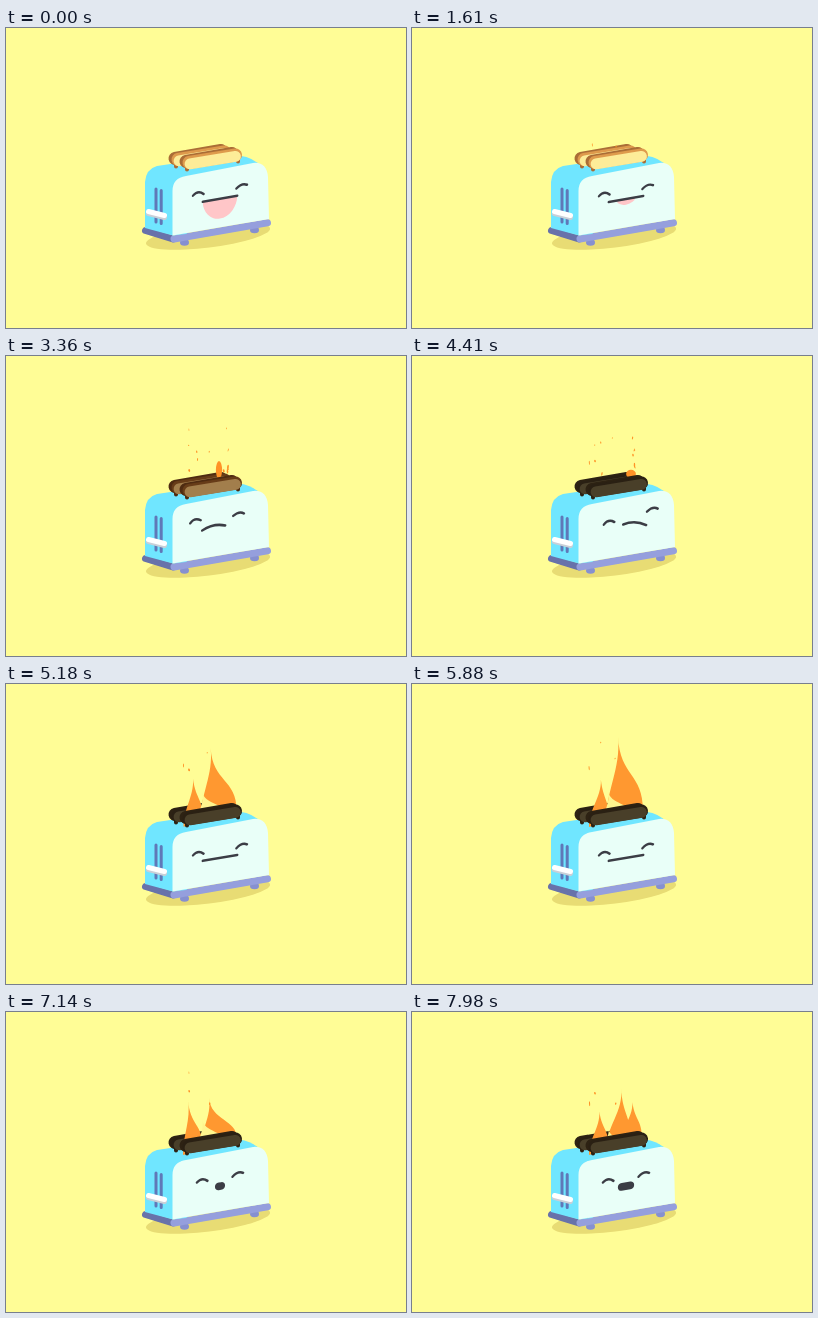
Write an HTML page that moves like this. It is 400 px wide and 300 px high and loops after 8000 ms.

```html
<!DOCTYPE html>
<html lang="en">
<head>
<meta charset="utf-8">
<title>Toaster</title>
<style>
html, body { margin: 0; width: 100%; height: 100%; overflow: hidden; background: #fffd96; }
svg { display: block; width: 100vw; height: 100vh; }
</style>
</head>
<body>
<svg viewBox="0 0 400 300">
  <defs>
    <g id="slice" fill="none" stroke-linecap="round">
      <path d="M181 138V141.5M232 130V133.5" stroke="var(--crust)" stroke-width="4"/>
      <path d="M180 133.5L226 125.5" stroke="var(--crust)" stroke-width="13"/>
      <path d="M183 134.5L229.5 127" stroke="var(--rim)" stroke-width="13"/>
      <path d="M184 135.8L229.5 128.3" stroke="var(--crumb)" stroke-width="10.8"/>
    </g>
  </defs>
  <rect width="400" height="300" fill="#fffd96"/>
  <ellipse cx="202" cy="208" rx="62.5" ry="11.5" transform="rotate(-7 202 208)" fill="#e8dc74"/>

  <g fill="#8690d0">
    <ellipse cx="178.5" cy="214.5" rx="4.5" ry="3.2"/>
    <ellipse cx="248.5" cy="202" rx="4.5" ry="3.2"/>
  </g>
  <g fill="none" stroke-width="7" stroke-linecap="round">
    <path d="M139.5 202.500L167 211" stroke="#6872aa"/>
    <path d="M168 211L261.500 194.800" stroke="#959fdd"/>
  </g>

  <path d="M139 200V154Q140 141 151 138L222 127.500Q240 126 251 134.500L261 150L180 206L167 207.500Z" fill="#70e6ff"/>
  <path d="M166.500 207.500V163Q166.500 150 180 148L247 135Q260.500 133.500 262 149L263 191Z" fill="#e9fff8"/>
  <path d="M150 161V194M155.200 162.500V195.500" stroke="#5f78b8" stroke-width="3" stroke-linecap="round"/>
  <g stroke-width="5" stroke-linecap="round">
    <path d="M142.500 185.500L158.500 189.500" stroke="#c9d0d8"/>
    <path d="M142.500 183.500L158.500 187.500" stroke="#fff"/>
  </g>

  <g id="toast">
    <use href="#slice" x="-11" y="-3"/>
    <g id="fire">
      <path id="flame" fill="#ff9830"/>
      <path id="core" fill="#fff58e"/>
    </g>
    <g fill="#ff9226">
      <ellipse id="ember"/>
      <g id="sparks"></g>
    </g>
    <use href="#slice"/>
  </g>

  <g id="face" fill="none" stroke="#3b3d45" stroke-width="2.4" stroke-linecap="round">
    <path id="tongue" fill="#ffc6c8" stroke="none"/>
    <path id="mouth"/>
    <path id="eyeL" d="M-5.300 1.200Q-0.500 -3.700 5.300 1.400"/>
    <path id="eyeR" d="M-5.300 1.600Q0 -3.500 5.300 -0.400"/>
  </g>
</svg>
<script>
const LOOP = 8000, STEP = 70, TURN = 420;
const IGNITE = 4480;
const $ = id => document.getElementById(id);
const mix = (a, b, k) => a + (b - a) * k;
const clamp = v => Math.max(0, Math.min(1, v));
const ease = k => k * k * (3 - 2 * k);
const ramp = (t, from, length) => clamp((t - from) / length);
const set = (id, attrs) => {
  for (const name in attrs) $(id).setAttribute(name, attrs[name]);
};

// The neutral face; each mood names only what it changes.
const neutral = {
  x: 0, y: 0, spread: 21.7, lean: 0, brow: 0,
  mouthX: 0, mouthY: 6.2, half: 17.2, bend: 0, line: 2.5, tongue: 0
};
const squint = { y: 2.5, spread: 17.8, mouthY: 6.7, line: 7.7 };
const moods = [
  { at: 0, y: -1, mouthY: 6.8, tongue: 17.2 },
  { at: 1410 },
  { at: 2240, x: -3, y: -1.5, lean: .5, brow: 8, mouthX: -3.3, mouthY: 7.9, half: 11.5, bend: -5 },
  { at: 3710, x: 4.7, y: -3, lean: -2.5, brow: 5, mouthX: 4, mouthY: 7.5, half: 11.5, bend: -5 },
  { at: 4620, y: 2.7 },
  { at: 5950, y: 2.7, mouthY: 12, half: 2, line: 13 },
  { at: 6580, ...squint, half: 1.2 },
  { at: 7280, ...squint, half: 4.3 }
].map(mood => ({ ...neutral, ...mood }));

function drawFace(t) {
  const f = { ...moods[0] };
  for (const mood of moods) {
    const k = ease(ramp(t, mood.at, TURN));
    for (const key in f) f[key] = mix(f[key], mood[key], k);
  }
  const { mouthX: mx, mouthY: my, half, tongue } = f;
  const drop = -f.lean * .08 * half;
  set("face", { transform: `translate(${214 + f.x} ${165 + f.y}) skewY(-9.8)` });
  set("eyeL", { transform: `translate(${-f.spread} ${-2.2 - f.lean}) rotate(${-f.brow})` });
  set("eyeR", { transform: `translate(${f.spread} ${-2.2 + f.lean}) rotate(${f.brow})` });
  set("mouth", {
    d: `M${mx - half} ${my - drop}Q${mx} ${my + f.bend} ${mx + half} ${my + drop}`,
    "stroke-width": f.line
  });
  set("tongue", {
    d: tongue > .2 ? `M${mx - tongue} ${my}A${tongue} ${tongue ** 2 / 15} 0 0 0 ${mx + tongue} ${my}Z` : ""
  });
}

// Fresh, brown and charred
const shades = {
  crumb: ["#fdec98", "#a27e4c", "#493f29"],
  rim: ["#de9a4c", "#673c18", "#2a2013"],
  crust: ["#aa6d36", "#4e2b11", "#2d2213"]
};
const channels = hex => [1, 3, 5].map(i => parseInt(hex.slice(i, i + 2), 16));

function drawToast(t) {
  const burn = ramp(t, 1650, 1710) + ramp(t, 3360, 980);
  const i = burn < 1 ? 0 : 1;
  for (const name in shades) {
    const to = channels(shades[name][i + 1]);
    const rgb = channels(shades[name][i]).map((v, n) => Math.round(mix(v, to[n], burn - i)));
    $("toast").style.setProperty("--" + name, `rgb(${rgb})`);
  }
}

// One lick of fire, standing on the slanted slice between x0 and x1.
function lick(x0, x1, tipX, tipY) {
  const floor = x => 143 - (x - 177) * .3;
  const h = floor((x0 + x1) / 2) - tipY;
  return `M${x0} ${floor(x0)}C${x0} ${floor(x0) - h * .4} ${tipX + 3} ${tipY + h * .4} ${tipX} ${tipY}` +
    `C${tipX + 2} ${tipY + h * .5} ${x1} ${tipY + h * .45} ${x1} ${floor(x1)}Z`;
}

function drawFire(t) {
  const grow = ease(ramp(t, IGNITE, 770));
  $("fire").style.display = grow ? "" : "none";
  if (!grow) return;
  const turn = 2 * Math.PI * (t - 5880) / 840;
  const surge = Math.cos(turn), swing = Math.sin(turn / 2), fork = Math.max(0, swing);
  set("flame", {
    d: lick(177, 197, 186.5 + 2 * surge + 2.5 * swing, 92 + 4 * swing) +
      lick(194, 231 - 12 * fork, 206 + 3 * swing, 67 - 14 * surge - 5 * swing) +
      lick(208, 230, 220, mix(122, 87, fork))
  });
  set("core", { d: lick(191, 220 - 12 * fork, 196, 107 + 9 * fork) });
  const wide = mix(.3, 1, grow);
  set("fire", { transform: `translate(${212 * (1 - wide)} ${130 * (1 - grow)}) scale(${wide} ${grow})` });
}

let seed = 11;
const rand = () => (seed = (seed * 16807) % 2147483647) / 2147483647;
const sparks = Array.from({ length: 12 }, () => ({
  x: 180 + rand() * 42, phase: rand(), life: 600 + rand() * 500,
  w: .5 + rand() * .5, h: .7 + rand() * 1.8, tilt: rand() * 40 - 20
}));

function drawSparks(t) {
  const heat = ramp(t, 1300, 1900), lit = t > IGNITE + 500;
  const count = lit ? 3 : Math.ceil(heat * sparks.length);
  $("sparks").innerHTML = sparks.slice(0, count).map(s => {
    const age = (t / s.life + s.phase) % 1;
    const x = s.x + 3 * Math.sin(s.x + age * 4);
    const y = lit ? 92 - 35 * age : 122 - 54 * heat * age;
    const size = 1.1 - .6 * age;
    return `<ellipse rx="${s.w * size}" ry="${s.h * size}" transform="translate(${x} ${y}) rotate(${s.tilt})"/>`;
  }).join("");
}

// The small flame that flickers before the toast catches fire.
function drawEmber(t) {
  const size = ramp(t, 2400, 600) * (1 - ramp(t, IGNITE, 280));
  const pulse = Math.cos(Math.PI * (t - 3360) / 1050);
  set("ember", {
    cx: 216 - 3 * pulse, cy: 116 - 2 * pulse,
    rx: size * (4 - .9 * pulse), ry: size * (6.6 + 2.4 * pulse)
  });
}

function draw(now) {
  const t = Math.floor((now % LOOP) / STEP) * STEP;
  for (const part of [drawFace, drawToast, drawFire, drawSparks, drawEmber]) part(t);
}

const start = performance.now();
function tick() {
  draw(performance.now() - start);
  requestAnimationFrame(tick);
}
tick();
</script>
</body>
</html>
```
